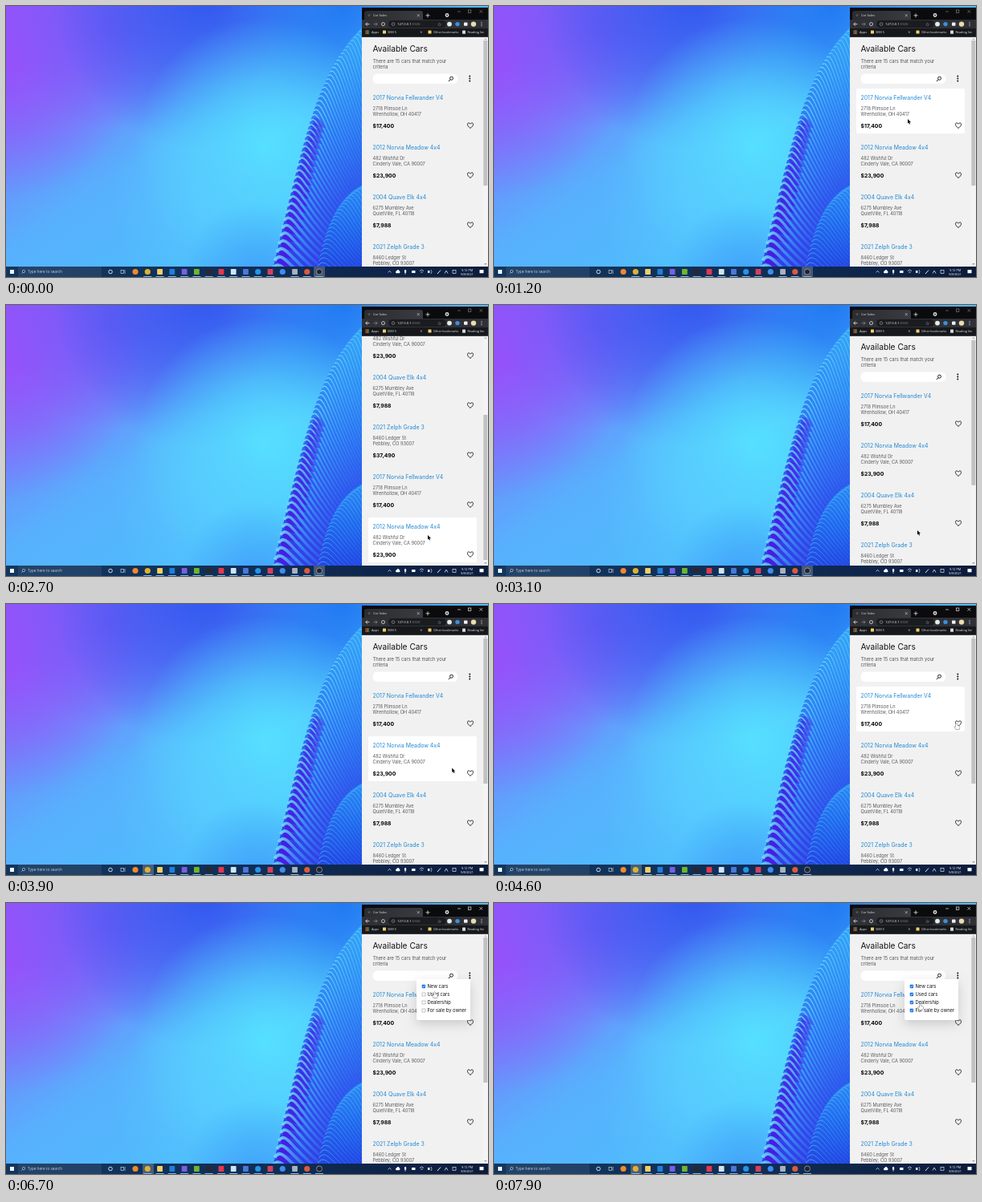
Write an HTML page with a canvas that moves like this. It is 600 by 338 pixels and loops after 8 s.

```html
<!DOCTYPE html>
<html lang="en">
<head>
<meta charset="utf-8">
<title>Car Sales</title>
<style>
html, body { margin: 0; width: 100%; height: 100%; overflow: hidden; background: #4bb0fb; }
canvas { display: block; width: 100vw; height: 100vh; }
</style>
</head>
<body>
<canvas id="stage"></canvas>
<script>
const W = 600, H = 338, LOOP = 8000, STEP = 100;
const PAGE = 'Inter, "Open Sans", sans-serif';
const UI = '"Open Sans", "Noto Sans", sans-serif';
const stage = document.getElementById('stage');
const ratio = window.devicePixelRatio || 1;
stage.width = W * ratio;
stage.height = H * ratio;
let g = stage.getContext('2d');

const cars = [
  ['2017 Norvia Fellwander V4', '2718 Plimsoe Ln', 'Wrenhollow, OH 40417', '$17,400'],
  ['2012 Norvia Meadow 4x4', '482 Wishful Dr', 'Cinderly Vale, CA 90007', '$23,900'],
  ['2004 Quave Elk 4x4', '6275 Mumbley Ave', 'QuietVille, FL 40118', '$7,988'],
  ['2021 Zelph Grade 3', '8460 Ledger St', 'Pebbley, CO 93007', '$37,490']
];
const list = [0, 1, 2, 3, 0, 1].slice(0, 6).map(i => cars[i]).slice(0, 6);
list.splice(4, 2, cars[0], cars[1]);

// Each key: time, then values
const scrollKeys = [
  [1300, 0], [1400, 35], [1500, 88], [1600, 121], [1800, 148],
  [2700, 148], [2800, 118], [2900, 60], [3000, 18], [3100, 1], [3200, 0]
];
const cursorKeys = [
  [900, 625, 225], [1000, 587, 205], [1100, 545, 168], [1200, 515, 141],
  [1900, 515, 141], [2500, 525, 287], [2700, 525, 287], [3100, 527, 281],
  [3500, 536, 262], [4000, 560, 190], [4400, 577, 147], [4600, 576, 149],
  [4700, 576, 149], [5200, 577, 94], [5500, 577, 91], [5600, 577, 91],
  [6200, 534, 103], [6400, 533, 107], [6600, 533, 107], [6700, 533.5, 111],
  [6900, 533, 113], [7200, 532, 122], [7500, 533, 133], [7700, 533, 138],
  [7900, 530.5, 126]
];
const ACTIVE_AT = 3700, MENU_AT = 5400;
const filters = [
  ['New cars', 6300], ['Used cars', 6900], ['Dealership', 7200], ['For sale by owner', 7700]
];

function at(keys, t) {
  if (t <= keys[0][0]) return keys[0].slice(1);
  for (let i = 1; i < keys.length; i++) {
    const a = keys[i - 1], b = keys[i];
    if (t <= b[0]) {
      const p = (t - a[0]) / (b[0] - a[0]);
      return a.slice(1).map((v, j) => v + (b[j + 1] - v) * p);
    }
  }
  return keys[keys.length - 1].slice(1);
}

function rect(x, y, w, h, fill, r = 0) {
  g.fillStyle = fill;
  g.beginPath();
  g.roundRect(x, y, w, h, r);
  g.fill();
}
function dot(x, y, r, fill) {
  g.fillStyle = fill;
  g.beginPath();
  g.arc(x, y, r, 0, 7);
  g.fill();
}
function ring(x, y, r, color, w = 0.7) {
  g.strokeStyle = color;
  g.lineWidth = w;
  g.beginPath();
  g.arc(x, y, r, 0, 7);
  g.stroke();
}
function line(color, w, ...p) {
  g.strokeStyle = color;
  g.lineWidth = w;
  g.beginPath();
  for (let i = 0; i < p.length; i += 2) g.lineTo(p[i], p[i + 1]);
  g.stroke();
}
function text(s, x, y, size, color, font = UI, weight = 400) {
  g.font = `${weight} ${size}px ${font}`;
  g.fillStyle = color;
  g.fillText(s, x, y);
}

function bezier(p, s) {
  const q = 1 - s;
  const mix = i => q * q * q * p[i] + 3 * q * q * s * p[i + 2] + 3 * q * s * s * p[i + 4] + s * s * s * p[i + 6];
  return [mix(0), mix(1)];
}

function blob(x, y, r, rgb, a) {
  const f = g.createRadialGradient(x, y, 0, x, y, r);
  f.addColorStop(0, `rgba(${rgb},${a})`);
  f.addColorStop(0.5, `rgba(${rgb},${a * 0.55})`);
  f.addColorStop(1, `rgba(${rgb},0)`);
  g.fillStyle = f;
  g.fillRect(0, 0, W, H);
}

function slope(p, stops) {
  const f = g.createLinearGradient(0, p[1], 0, 325);
  stops.forEach((c, i) => f.addColorStop(i / (stops.length - 1), c));
  g.fillStyle = f;
  g.beginPath();
  for (let i = 0; i <= 40; i++) g.lineTo(...bezier(p, i / 40));
  g.lineTo(p[6] - 4, H);
  g.lineTo(446, H);
  g.lineTo(446, p[1]);
  g.fill();
}

function fins(p, count, reach, thick, alpha) {
  for (let k = 0; k <= count; k++) {
    const s = k / count, [x, y] = bezier(p, s);
    const drop = reach * (1 - s) + 34 * s;
    const low = Math.max(0, (s - 0.5) * 2);
    if (thick && low > 0) {
      g.fillStyle = `rgba(72,28,226,${0.4 + 0.6 * low})`;
      g.beginPath();
      g.moveTo(x + 1, y + 2);
      g.quadraticCurveTo(x + 10, y - 6, x + 17 + 8 * low, y + 12);
      g.lineTo(x + 4, y + 9);
      g.fill();
    }
    const f = g.createLinearGradient(x, 0, x + 56, 0);
    f.addColorStop(0, `rgba(120,225,255,${alpha})`);
    f.addColorStop(0.35, `rgba(70,180,255,${alpha * 0.8})`);
    f.addColorStop(1, 'rgba(50,120,250,0.1)');
    g.strokeStyle = f;
    g.lineWidth = 0.9 + thick * s * s;
    g.beginPath();
    g.moveTo(x - 1, y + 3);
    g.bezierCurveTo(x + 9, y - 8 - 5 * low, x + 18, y + drop * 0.45, x + 56, y + drop);
    g.stroke();
  }
}

function wallpaper() {
  const f = g.createLinearGradient(0, 0, 220, 320);
  f.addColorStop(0, '#855cfb');
  f.addColorStop(0.35, '#6f86fb');
  f.addColorStop(0.65, '#58b0fd');
  f.addColorStop(1, '#4fbcfc');
  g.fillStyle = f;
  g.fillRect(0, 0, W, H);
  blob(0, 70, 170, '155,75,250', 0.85);
  blob(130, 25, 130, '110,85,245', 0.7);
  blob(250, -10, 190, '45,85,238', 0.95);
  blob(420, 0, 150, '30,120,242', 0.95);
  blob(320, 175, 160, '85,228,255', 0.95);
  blob(250, 240, 120, '90,205,255', 0.6);
  blob(310, 335, 90, '55,145,250', 0.6);

  g.save();
  g.beginPath();
  g.rect(0, 0, 444, 326);
  g.clip();
  const ridge = [444, 26, 388, 80, 372, 160, 333, 325];
  slope(ridge, ['#35a6f8', '#2f8ef4', '#2c6df0', '#2f4fea', '#3040e6']);
  fins(ridge, 46, 165, 3.2, 0.85);
  const inner = [446, 222, 412, 238, 398, 275, 388, 328];
  slope(inner, ['#2a8cf5', '#2168ee', '#2348e4']);
  fins(inner, 24, 90, 0, 0.6);
  g.restore();
}

function taskbar(active) {
  const f = g.createLinearGradient(0, 0, W, 0);
  f.addColorStop(0, '#12365f');
  f.addColorStop(0.6, '#0f2c55');
  f.addColorStop(1, '#0c1b3a');
  g.fillStyle = f;
  g.fillRect(0, 325, W, 13);
  rect(5, 329, 5, 5, '#f2f6fa');
  rect(15, 325, 104, 13, 'rgba(255,255,255,0.07)');
  ring(22, 331, 1.7, '#cfd8e3', 0.6);
  line('#cfd8e3', 0.6, 20.8, 332.3, 19.4, 333.8);
  text('Type here to search', 27, 333.4, 4.7, '#c3ccd8');
  ring(130, 331.5, 2.3, '#fff', 0.8);
  g.strokeStyle = '#dfe6ee';
  g.lineWidth = 0.6;
  g.strokeRect(143, 329.5, 3.4, 4);
  line('#dfe6ee', 0.6, 148, 329, 148, 334);

  rect(active ? 170 : 383, 325, 14, 13, 'rgba(255,255,255,0.22)');
  const icons = ['#f08a2c', '#e0b02f', '#f3cf62', '#1f7fd6', '#7b5fe0', '#6fb52c',
    '#2a2730', '#e5384b', '#cfe6ee', '#4b78d8', '#2495e8', '#d5405c', '#3f8cf0', '#a9b2bd', '#dd5a3a', '#24222b'];
  icons.forEach((c, i) => {
    const x = 161 + i * 15.27;
    if ([0, 1, 10, 12, 14, 15].includes(i)) dot(x, 331.5, 3.6, c);
    else rect(x - 3.4, 328, 6.8, 7, c, 0.8);
    if (i && i !== 12) rect(x - 5, 337, 10, 1, '#76b9ed');
  });
  ring(390, 331.5, 3.5, '#c8c8cf', 0.6);

  line('#fff', 0.7, 475.5, 332.3, 477.5, 330.4, 479.5, 332.3);
  rect(485, 330.5, 5.5, 2.8, '#fff', 1.4);
  dot(488, 330.7, 1.6, '#fff');
  rect(496, 329, 2.2, 4, '#fff', 1);
  line('#fff', 0.6, 497, 333, 497, 335);
  rect(505, 330, 4.5, 3, '#fff', 0.5);
  line('#fff', 0.7, 515, 330.5, 517.5, 329, 520, 330.5);
  line('#fff', 0.7, 516.2, 332.5, 517.5, 331.6, 518.8, 332.5);
  rect(525, 330, 2.4, 3, '#fff');
  line('#fff', 0.6, 529, 329, 530, 331.5, 529, 334);
  line('#fff', 0.9, 537, 334, 541, 329.5);
  line('#fff', 0.7, 546, 333.5, 548, 330, 550, 333.5);
  g.strokeStyle = '#fff';
  g.lineWidth = 0.6;
  g.strokeRect(556, 329.5, 4, 4);
  text('9:12 PM', 567, 330.8, 3.8, '#fff');
  text('9/8/2021', 566, 336.2, 3.8, '#fff');
  rect(589.5, 329, 5, 4.2, '#fff', 0.5);
}

function browser(active) {
  const dim = active ? '#fff' : '#8b8b8e';
  rect(443, 2, 157, 36.5, '#0b0b0d');
  const f = g.createLinearGradient(445, 0, 520, 0);
  f.addColorStop(0, '#2b2c30');
  f.addColorStop(1, '#3a3b40');
  rect(446, 6, 73, 12, f, [3, 3, 0, 0]);
  dot(452, 11.6, 1.7, '#4c4d52');
  text('Car Sales', 457, 13.2, 4, '#e4e4e6');
  line('#d8d8da', 0.6, 511.8, 10.2, 514.8, 13.2);
  line('#d8d8da', 0.6, 514.8, 10.2, 511.8, 13.2);
  line('#e4e4e6', 0.8, 522.5, 11.8, 527.5, 11.8);
  line('#e4e4e6', 0.8, 525, 9.3, 525, 14.3);
  dot(549, 11.5, 2.4, '#d9dadd');
  dot(549, 11.5, 1, '#222');
  line(dim, 0.6, 562, 7, 566, 7);
  g.strokeStyle = dim;
  g.strokeRect(575.3, 5, 3.6, 3.6);
  line(dim, 0.6, 589.5, 5, 593.2, 8.7);
  line(dim, 0.6, 593.2, 5, 589.5, 8.7);

  rect(443, 17, 157, 11, '#303136');
  rect(476, 18, 72, 9, '#1b1c20', 4.5);
  line('#e6e6e8', 0.8, 450, 20.4, 447.8, 22.6, 450, 24.8);
  line('#e6e6e8', 0.8, 447.8, 22.6, 452.4, 22.6);
  line('#85868a', 0.8, 460, 20.4, 462.2, 22.6, 460, 24.8);
  line('#85868a', 0.8, 457.6, 22.6, 462.2, 22.6);
  ring(469.5, 22.6, 2, '#e6e6e8', 0.8);
  ring(482, 22.6, 1.8, '#c8c9cc', 0.5);
  text('127.0.0.1', 487, 24.1, 4.2, '#f2f2f3');
  const w = g.measureText('127.0.0.1').width;
  text(':5500', 487 + w, 24.1, 4.2, '#86878b');
  text('☆', 537, 24.8, 6, '#ddd', '"DejaVu Sans", sans-serif');
  dot(552, 22.6, 2.9, '#e3ece6');
  dot(562, 22.6, 2.7, '#3a8fe0');
  rect(570, 20.6, 4.5, 4.2, '#f0f0f2', 0.8);
  dot(582, 22.6, 3.2, '#e9dcae');
  [20.6, 22.6, 24.6].forEach(y => dot(592, y, 0.55, '#eee'));

  rect(443, 28, 157, 10.5, '#17181b');
  for (let i = 0; i < 9; i++) {
    rect(447.3 + i % 3 * 1.7, 30.3 + Math.floor(i / 3) * 1.7, 1.2, 1.2, ['#e05a4d', '#e9a13b', '#6fae62'][i % 3]);
  }
  text('Apps', 455, 34.2, 3.9, '#e6e6e8');
  rect(469, 30.6, 4, 4, '#f0cf68', 0.5);
  text('SEM 5', 475, 34.2, 3.9, '#e6e6e8');
  text('»', 515.5, 34.2, 5, '#e6e6e8');
  rect(525.5, 30.6, 4, 4, '#f0cf68', 0.5);
  text('Other bookmarks', 532, 34.2, 3.8, '#e6e6e8');
  rect(568, 30.4, 4, 4.4, '#d5d6d9', 0.5);
  text('Reading list', 574.5, 34.2, 3.8, '#e6e6e8');
}

function heart(x, y) {
  g.strokeStyle = '#111';
  g.lineWidth = 0.9;
  g.beginPath();
  g.moveTo(x, y + 3.4);
  g.bezierCurveTo(x - 6.4, y - 1, x - 2.6, y - 5.4, x, y - 1.8);
  g.bezierCurveTo(x + 2.6, y - 5.4, x + 6.4, y - 1, x, y + 3.4);
  g.closePath();
  g.stroke();
}

function page(scroll, x, y, canHover) {
  g.save();
  g.beginPath();
  g.rect(443, 38.5, 157, 286.5);
  g.clip();
  rect(443, 38, 157, 288, '#f1f1f1');
  g.save();
  g.translate(0, -scroll);
  text('Available Cars', 456.5, 57, 10.2, '#151515', PAGE);
  text('There are 15 cars that match your', 456.5, 70.6, 5.8, '#555', PAGE);
  text('criteria', 456.5, 77.6, 5.8, '#555', PAGE);
  rect(456.5, 84.5, 106, 12.5, '#fff', 6.2);
  ring(554.5, 90.2, 2, '#111', 0.9);
  line('#111', 1, 553, 91.8, 550.8, 94);
  [87.6, 90.5, 93.4].forEach(v => dot(577.3, v, 1, '#111'));
  list.forEach((c, i) => {
    const top = 103 + 62 * i, v = y + scroll;
    if (canHover && x > 451 && x < 586 && v > top && v < top + 56) rect(451, top, 135, 56, '#fff', 2);
    if (i > 4 && !c) return;
    text(c[0], 456.5, top + 13.7, 6.95, '#2088d4', PAGE);
    text(c[1], 456.5, top + 27, 5.65, '#5a5a5a', PAGE);
    text(c[2], 456.5, top + 34.1, 5.65, '#5a5a5a', PAGE);
    text(c[3], 456.5, top + 48.6, 6.8, '#050505', PAGE, 700);
    heart(578, top + 46);
  });
  g.restore();

  rect(593.6, 38, 6.4, 288, '#f4f4f4');
  rect(594.3, 43 + scroll * 0.635, 5, 181, '#c1c1c1');
  line('#777', 0.7, 595.6, 42, 596.9, 40.7, 598.2, 42);
  line('#444', 0.7, 595.6, 321, 596.9, 322.3, 598.2, 321);
  g.restore();
}

function menu(t) {
  g.save();
  g.shadowColor = 'rgba(0,0,0,0.16)';
  g.shadowBlur = 14 * ratio;
  g.shadowOffsetY = 5 * ratio;
  rect(511, 95, 67, 51, '#fff', 2);
  g.restore();
  filters.forEach(([name, when], i) => {
    const y = 104 + 10 * i;
    if (t >= when) {
      rect(517.7, y - 2.2, 4.4, 4.4, '#1a73e8', 0.7);
      line('#fff', 0.7, 518.7, y, 519.6, y + 1, 521.2, y - 1.1);
    } else {
      g.strokeStyle = '#8a8a8a';
      g.lineWidth = 0.5;
      g.strokeRect(518, y - 2, 4, 4);
    }
    text(name, 524.5, y + 2, 5.8, '#161616', PAGE);
  });
}

function pointer(x, y, hand) {
  g.save();
  g.translate(x, y);
  g.beginPath();
  if (hand) {
    g.moveTo(-0.9, 4.6);
    g.lineTo(-0.9, 0.6);
    g.quadraticCurveTo(0, -0.6, 0.9, 0.6);
    g.lineTo(0.9, 2.6);
    g.lineTo(3.6, 3.3);
    g.lineTo(3.6, 5.6);
    g.lineTo(2.7, 7.6);
    g.lineTo(-0.9, 7.6);
    g.lineTo(-2.8, 4.4);
    g.quadraticCurveTo(-2.2, 3.4, -0.9, 4.6);
  } else {
    [[0, 0], [0, 5.6], [1.3, 4.5], [2.2, 6.5], [3.2, 6], [2.3, 4.1], [4, 4]].forEach(p => g.lineTo(...p));
  }
  g.closePath();
  g.fillStyle = hand ? '#fff' : '#0a0a0a';
  g.strokeStyle = hand ? '#222' : 'rgba(255,255,255,0.7)';
  g.lineWidth = hand ? 0.7 : 0.4;
  g.stroke();
  g.fill();
  g.restore();
}

const back = document.createElement('canvas');
back.width = stage.width;
back.height = stage.height;
const main = g;
g = back.getContext('2d');
g.scale(ratio, ratio);
wallpaper();
g = main;
g.scale(ratio, ratio);

function draw(t) {
  const active = t >= ACTIVE_AT, open = t >= MENU_AT;
  const [scroll] = at(scrollKeys, t), [x, y] = at(cursorKeys, t);
  const scrolling = (t >= 1400 && t < 1900) || (t > 2700 && t < 3200);
  g.drawImage(back, 0, 0, W, H);
  page(scroll, x, y, !scrolling && !open);
  browser(active);
  taskbar(active);
  if (open) menu(t);
  const onHeart = Math.abs(x - 578) < 5 && Math.abs(y - 149) < 4;
  const onDots = Math.abs(x - 577) < 4 && Math.abs(y - 91) < 6;
  if (x < W) pointer(x, y, open || (active && (onHeart || onDots)));
}

const start = performance.now();
function tick() {
  const t = (performance.now() - start) % LOOP;
  draw(Math.floor(t / STEP) * STEP);
  requestAnimationFrame(tick);
}
tick();
</script>
</body>
</html>
```
